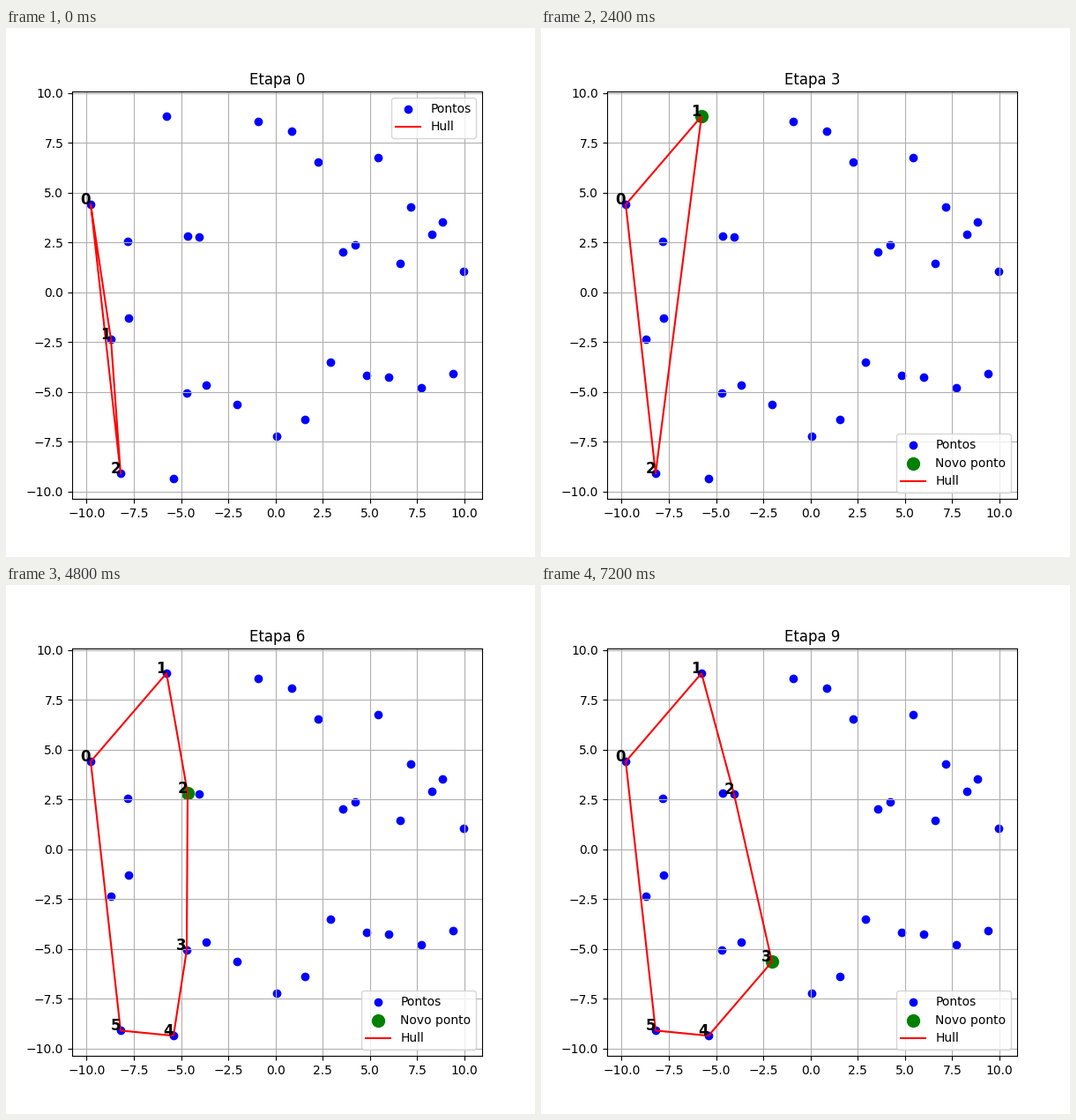
These frames come from a looping animation (600x600 px, 8 s). A matplotlib script:

```python
import numpy as np
import matplotlib.pyplot as plt
from matplotlib.animation import FuncAnimation

STEPS = 10
STEP_MS = 800

# Key points from left to right: the first three start the hull,
# every later one is added by one step.
VISITED = [
    (-9.78, 4.41), (-8.71, -2.36), (-8.20, -9.09), (-7.83, 2.55),
    (-7.78, -1.29), (-5.77, 8.84), (-5.40, -9.35), (-4.70, -5.06),
    (-4.65, 2.82), (-4.05, 2.78), (-3.67, -4.66), (-2.04, -5.64),
]


def waiting_points(count=18):
    """Points right of the hull: a fading wave, denser to the right."""
    i = np.arange(count)
    x = -0.92 + 10.87 * (i / (count - 1)) ** 0.85
    cycles = 0.5 * i - 0.006 * i ** 2
    y = 0.6 + (8 - 0.2 * i) * np.cos(2 * np.pi * cycles)
    return list(zip(x, y))


def cross(o, a, b):
    return (a[0] - o[0]) * (b[1] - o[1]) - (a[1] - o[1]) * (b[0] - o[0])


def chain(points):
    """Half of the hull, keeping only clockwise turns."""
    kept = []
    for p in points:
        while len(kept) > 1 and cross(kept[-2], kept[-1], p) >= 0:
            kept.pop()
        kept.append(p)
    return kept


def clockwise_hull(points):
    return chain(points)[:-1] + chain(points[::-1])[:-1]


points = VISITED + waiting_points()
fig, ax = plt.subplots(figsize=(6, 6), dpi=100)


def draw(step):
    ax.clear()
    hull = clockwise_hull(VISITED[:step + 3])

    ax.scatter(*zip(*points), color="blue", label="Pontos")
    if step > 0:
        ax.scatter(*VISITED[step + 2], color="green", s=100, label="Novo ponto")
    ax.plot(*zip(*hull, hull[0]), color="red", label="Hull")
    for i, (x, y) in enumerate(hull):
        ax.text(x, y, str(i), fontsize=12, fontweight="bold", ha="right")

    ax.set_xlim(-10.765, 10.937)
    ax.set_ylim(-10.358, 10.084)
    ax.set_title(f"Etapa {step}")
    ax.legend(loc="lower right" if step else "upper right")
    ax.grid(True)


anim = FuncAnimation(fig, draw, frames=STEPS, init_func=lambda: draw(0),
                     interval=STEP_MS, repeat=True, repeat_delay=0)
plt.show()
```
